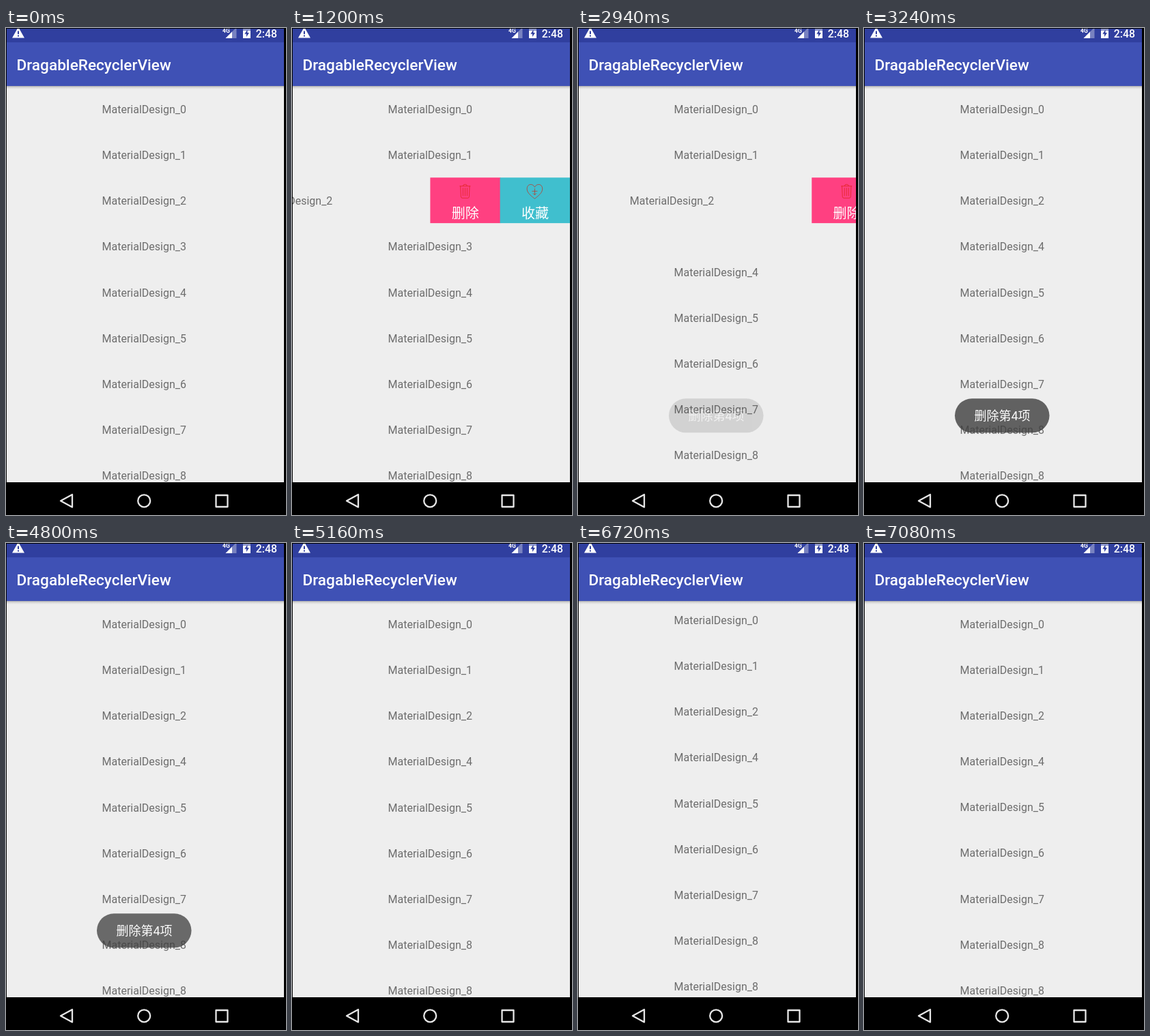
These frames come from a looping animation (410 by 714 pixels, 8 s). An HTML page:

```html
<!DOCTYPE html>
<html lang="zh-CN">
<head>
<meta charset="utf-8">
<title>DragableRecyclerView</title>
<style>
  html, body { margin: 0; width: 100%; height: 100%; overflow: hidden; background: #000; }
  svg { display: block; width: 410px; height: 714px; }
  text { font-family: Roboto, "Noto Sans CJK SC", "Noto Sans CJK", sans-serif; }
  .item { font-size: 16px; fill: #6d6d6d; }
  .label { font-size: 20px; font-weight: 500; fill: #fff; text-anchor: middle; }
  .icon { fill: none; stroke: #d81e06; stroke-opacity: .62; stroke-width: 1; stroke-linejoin: round; }
  .nav { fill: none; stroke: #e6e6e6; stroke-width: 2.3; stroke-linejoin: round; }
</style>
</head>
<body>
<svg viewBox="0 0 410 714">
  <defs>
    <clipPath id="screen"><rect x="1" y="1" width="406" height="665"/></clipPath>
    <clipPath id="list"><rect x="1" y="85" width="406" height="581"/></clipPath>
    <linearGradient id="shade" x2="0" y2="1">
      <stop offset="0" stop-opacity=".28"/>
      <stop offset=".4" stop-opacity=".1"/>
      <stop offset="1" stop-opacity="0"/>
    </linearGradient>
  </defs>
  <rect width="410" height="714"/>

  <g clip-path="url(#list)">
    <rect x="1" y="85" width="406" height="581" fill="#eee"/>
    <g id="rows"></g>
  </g>

  <g clip-path="url(#screen)">
    <rect x="1" y="85" width="406" height="5" fill="url(#shade)"/>
    <rect x="1" y="21" width="406" height="64" fill="#3f51b5"/>
    <rect x="1" y="1" width="406" height="20" fill="#303f9f"/>
    <text x="15.5" y="62" font-size="22.6" font-weight="500" fill="#fff">DragableRecyclerView</text>

    <path d="M18-1.5L27 14.5H9Z" fill="#fff"/>
    <path d="M17 4.5h2v4.5h-2zM17 10.5h2v2h-2z" fill="#303f9f"/>
    <path d="M337.5-1V15H321.5Z" fill="#fff" fill-opacity=".35"/>
    <path d="M331 5.5V15H321.5Z" fill="#fff"/>
    <text x="317" y="6.5" font-size="8.5" font-weight="700" fill="#fff">4G</text>
    <path d="M347 0h11v5h-11z" fill="#fff" fill-opacity=".45"/>
    <path d="M347 4h11v11h-11z" fill="#fff"/>
    <path d="M353.5 2.5L349.3 8.7H352V13L356 7H353.5Z" fill="#303f9f"/>
    <text x="365.8" y="13.8" font-size="15.8" font-weight="500" fill="#fff">2:48</text>
  </g>

  <g id="toast">
    <rect x="133" y="543.3" width="138.5" height="50" rx="25" fill="#3f3f3f" fill-opacity=".8"/>
    <text x="202.5" y="575" font-size="18" fill="#fff" text-anchor="middle">删除第4项</text>
  </g>

  <g class="nav">
    <path d="M80 693.2L97 684V702.5Z"/>
    <circle cx="202.2" cy="693.3" r="9"/>
    <rect x="307.5" y="685" width="17" height="17"/>
  </g>
</svg>

<script>
const LOOP = 8000, STEP = 60, PITCH = 67.15, TOP = 85, OPEN = -204.6;
const labels = [0, 1, 2, 3, 4, 5, 6, 7, 8, 8];
const SWIPED = 2, REMOVED = 3;

const buttons = `
  <rect x="407" width="103" height="66.8" fill="#ff4081"/>
  <rect x="509.2" width="103" height="66.8" fill="#40bfce"/>
  <path class="icon" d="M450 12.5H466M455 12.5Q455 10 458 10T461 12.5
    M451.3 12.5L452 28Q452.2 30 454 30H462Q463.8 30 464 28L464.7 12.5
    M455 15V27M458 15V27M461 15V27"/>
  <path class="icon" d="M560 31C555 27 548.7 22.5 548.7 16.5C548.7 9 557 8 560 14
    C563 8 571.3 9 571.3 16.5C571.3 22.5 565 27 560 31Z
    M560 16V25M556 20H564M557.5 23L560 25.5L562.5 23"/>
  <text class="label" x="458.3" y="60">删除</text>
  <text class="label" x="560.5" y="60">收藏</text>`;

const list = document.getElementById("rows");
const toast = document.getElementById("toast");
list.innerHTML = labels.map((n, i) =>
  `<g><text class="item" x="140.5" y="40">MaterialDesign_${n}</text>${i === SWIPED ? buttons : ""}</g>`
).join("");
const rows = [...list.children];

const smooth = p => p * p * (3 - 2 * p);
const settle = p => 1 - (1 - p) ** 2;

// keys: [time, value] pairs
function track(t, keys, ease = smooth) {
  if (t <= keys[0][0]) return keys[0][1];
  for (let i = 1; i < keys.length; i++) {
    const [a, from] = keys[i - 1], [b, to] = keys[i];
    if (t <= b) return from + (to - from) * ease((t - a) / (b - a));
  }
  return keys[keys.length - 1][1];
}

function draw(t) {
  const swipe = track(t, [[720, 0], [1200, OPEN], [2640, OPEN], [3120, 0]]);
  const fade = track(t, [[2700, 1], [2820, 0]], p => p);
  const lift = track(t, [[2820, 0], [3080, PITCH]]);
  const scroll = track(t, [[5880, 0], [6000, -11.3], [6300, -11.3], [6360, -11.7], [7080, -0.4]]);
  const shown = track(t, [[2820, 0], [3240, 1], [4740, 1], [5160, 0]]);

  rows.forEach((row, i) => {
    const y = TOP + i * PITCH + scroll - (i > REMOVED ? lift : 0);
    row.setAttribute("transform", `translate(${i === SWIPED ? swipe : 0} ${y})`);
  });
  rows[REMOVED].setAttribute("opacity", fade);
  toast.setAttribute("opacity", shown);
}

const start = performance.now();
function tick() {
  const t = (performance.now() - start) % LOOP;
  draw(Math.floor(t / STEP) * STEP);
  requestAnimationFrame(tick);
}
tick();
</script>
</body>
</html>
```
